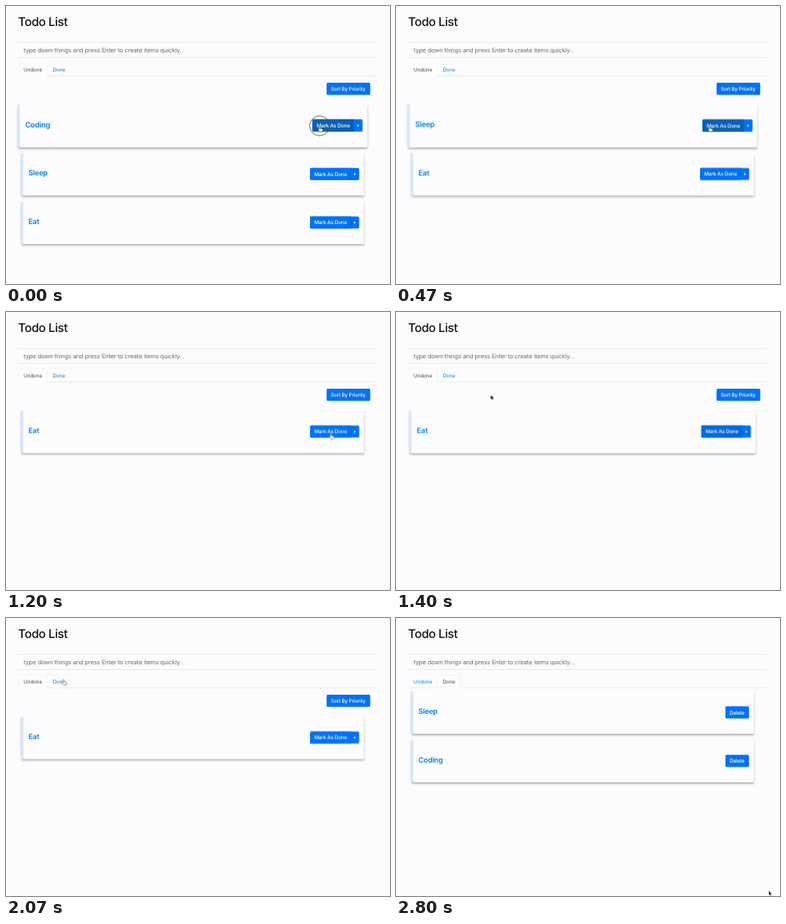
An HTML page for the animation above (2870 ms loop, 480 by 348 pixels).

```html
<!DOCTYPE html>
<html lang="en">
<head>
<meta charset="utf-8">
<title>Todo List</title>
<style>
  :root { --bg: #fcfcfe; --blue: #0272f6; --dark: #0a60b4; --link: #0a80dc; --line: #ebebe2; }
  html, body { margin: 0; width: 100%; height: 100%; overflow: hidden; background: var(--bg); }
  svg { display: block; width: 100%; height: 100%; }
  text { font: 400 6.4px Inter, Roboto, sans-serif; letter-spacing: -.13px; text-rendering: geometricPrecision; }
  .heading { font-size: 15px; font-weight: 500; letter-spacing: -.38px; fill: #14150c; }
  .hint { font-size: 7.5px; letter-spacing: -.1px; fill: #6b6c60; }
  .name { font-size: 9.2px; font-weight: 600; letter-spacing: -.22px; fill: var(--link); }
  .label { font-weight: 500; letter-spacing: -.18px; fill: #fff; }
  .link { fill: var(--link); }
  .active { fill: #4a4d42; }
  .line { fill: none; stroke: var(--line); }
  .faint { stroke: #f3f3ec; }
  .blue { fill: var(--blue); }
  .face { fill: var(--bg); }
  .glow { fill: #ebebdc; filter: blur(1.2px); }
  .shade { fill: #a2a2a8; filter: blur(.8px); }
  .edge { fill: #d9e5fa; }

  .hover { color: var(--blue); transform-origin: 234px 150px; }
  .coding .hover { color: var(--dark); transform: scale(1.02); }

  .undone, .done, .tabhover, .coding, .sleep, .eat, .hand, .arrow, .ring { animation: 2870ms step-end infinite; }
  .sleep .hover, .eat .hover { animation: 2870ms linear infinite; }
  .cursor { animation: move 2870ms ease-in-out infinite; }
  .undone { animation-name: undone; }
  .done { animation-name: done; }
  .tabhover { animation-name: tabhover; }
  .coding { animation-name: coding; }
  .sleep { animation-name: sleep; }
  .eat { animation-name: eat; }
  .sleep .hover { animation-name: grow; }
  .eat .hover { animation-name: pulse; }
  .hand { animation-name: hand; }
  .arrow { animation-name: arrow; }
  .ring { animation-name: ring; }

  @keyframes undone { 0% { opacity: 1 } 76.6%, 100% { opacity: 0 } }
  @keyframes done { 0% { opacity: 0 } 76.6%, 100% { opacity: 1 } }
  @keyframes tabhover { 0% { opacity: 0 } 64%, 100% { opacity: 1 } }

  /* Cards step up one slot as each item is finished. */
  @keyframes coding { 0% { opacity: 1 } 6.9%, 100% { opacity: 0 } }
  @keyframes sleep {
    0% { transform: translateY(60.7px); opacity: 1 }
    6.9% { transform: none; opacity: 1 }
    41.8%, 100% { transform: none; opacity: 0 }
  }
  @keyframes eat {
    0% { transform: translateY(121.4px) }
    6.9% { transform: translateY(60.7px) }
    41.8%, 100% { transform: none }
  }
  @keyframes grow {
    0%, 6.9% { transform: scale(1); color: var(--blue) }
    9.4% { transform: scale(1.01); color: #0568dc }
    14%, 100% { transform: scale(1.02); color: var(--dark) }
  }
  @keyframes pulse {
    0%, 41.8% { transform: scale(1); color: var(--blue) }
    46% { transform: scale(1.016); color: var(--dark) }
    48.8% { transform: scale(1.01); color: #0568dc }
    54%, 100% { transform: scale(1); color: var(--blue) }
  }

  @keyframes move {
    0%, 18.5% { transform: translate(392px, 150px) }
    26%, 41.8% { transform: translate(406px, 151.5px) }
    48.8% { transform: translate(118.5px, 104px) }
    56% { transform: translate(113px, 102px) }
    66%, 77% { transform: translate(72px, 76.5px) }
    83.6%, 87% { transform: translate(344px, 227px) }
    93% { transform: translate(430px, 285px) }
    97.5%, 100% { transform: translate(466px, 341.5px) }
  }
  @keyframes hand { 0% { opacity: 1 } 43% { opacity: 0 } 64% { opacity: 1 } 77.5%, 100% { opacity: 0 } }
  @keyframes arrow { 0% { opacity: 0 } 43% { opacity: 1 } 64% { opacity: 0 } 77.5%, 100% { opacity: 1 } }
  @keyframes ring {
    0% { opacity: 1 } 4.6% { opacity: 0 }
    37.2% { opacity: 1 } 41.8% { opacity: 0 }
    74.2% { opacity: 1 } 77%, 100% { opacity: 0 }
  }
</style>
</head>
<body>
<svg viewBox="0 0 480 348">
  <defs>
    <g id="card">
      <rect class="glow" x="18" y="124" width="430.5" height="55.5" rx="2"/>
      <rect class="shade" x="20.5" y="127" width="426.5" height="50.7" rx="1"/>
      <rect class="edge" x="18" y="124" width="4" height="52"/>
      <rect class="face" x="21.5" y="123" width="426" height="53.5" rx="1"/>
    </g>
    <g id="mark">
      <rect class="blue" x="380" y="142" width="61.5" height="15.2" rx="1.6"/>
      <path fill="currentColor" d="M431 142H381.6a1.6 1.6 0 0 0-1.6 1.6v12a1.6 1.6 0 0 0 1.6 1.6H431z"/>
      <path stroke="#0a66d8" stroke-width=".4" d="M431 142v15.2"/>
      <path fill="#fff" d="M435.2 148l2 1.7-2 1.7z"/>
      <text class="label" x="385.2" y="152">Mark As Done</text>
    </g>
    <g id="delete">
      <rect class="blue" x="411.7" y="142" width="29.6" height="15.2" rx="1.6"/>
      <text class="label" x="417" y="152">Delete</text>
    </g>
  </defs>

  <text class="heading" x="15" y="25">Todo List</text>
  <path class="line" d="M15 45.5H463M15 64.5H463"/>
  <text class="hint" x="22" y="58">type down things and press Enter to create items quickly...</text>

  <g class="undone">
    <path class="line faint" d="M15 71.5H51.5V87"/>
    <path class="line" d="M51.5 87.5H463"/>
    <path class="line faint tabhover" d="M52 71.5H80.5V87"/>
    <text class="active" x="22" y="81.8">Undone</text>
    <text class="link" x="58.5" y="81.8">Done</text>
    <rect class="blue" x="400.7" y="96" width="54.6" height="15.3" rx="1.6"/>
    <text class="label" x="406" y="106">Sort By Priority</text>

    <g class="eat"><g class="hover">
      <use href="#card"/><use href="#mark"/><text class="name" x="28" y="151.8">Eat</text>
    </g></g>
    <g class="sleep"><g class="hover">
      <use href="#card"/><use href="#mark"/><text class="name" x="28" y="151.8">Sleep</text>
    </g></g>
    <g class="coding"><g class="hover">
      <use href="#card"/><use href="#mark"/><text class="name" x="28" y="151.8">Coding</text>
    </g></g>
  </g>

  <g class="done">
    <path class="line faint" d="M51.5 87V71.5H80.5V87"/>
    <path class="line" d="M15 87.5H51.5M80.5 87.5H463"/>
    <text class="link" x="22" y="81.8">Undone</text>
    <text class="active" x="58.5" y="81.8">Done</text>
    <g transform="translate(0 -31.5)">
      <use href="#card"/><use href="#delete"/><text class="name" x="28" y="151.8">Sleep</text>
    </g>
    <g transform="translate(0 29.2)">
      <use href="#card"/><use href="#delete"/><text class="name" x="28" y="151.8">Coding</text>
    </g>
  </g>

  <g class="cursor">
    <circle class="ring" r="12.4" fill="none" stroke="#5d5f1f" stroke-width=".9"/>
    <path class="hand" fill="#fff" stroke="#333" stroke-width=".6" transform="translate(0 .6) scale(.85)"
      d="M-1 .8a.9.9 0 0 1 1.8 0V3l3 .7q1 .3 .8 1.4L4 8H.2L-2.4 4.8q.2-1 1.4-.2z"/>
    <path class="arrow" fill="#000" stroke="#fff" stroke-width=".3"
      d="M0 0V5.6L1.4 4.4 2.3 6.4 3.2 6 2.3 4.1H4z"/>
  </g>
</svg>
</body>
</html>
```
